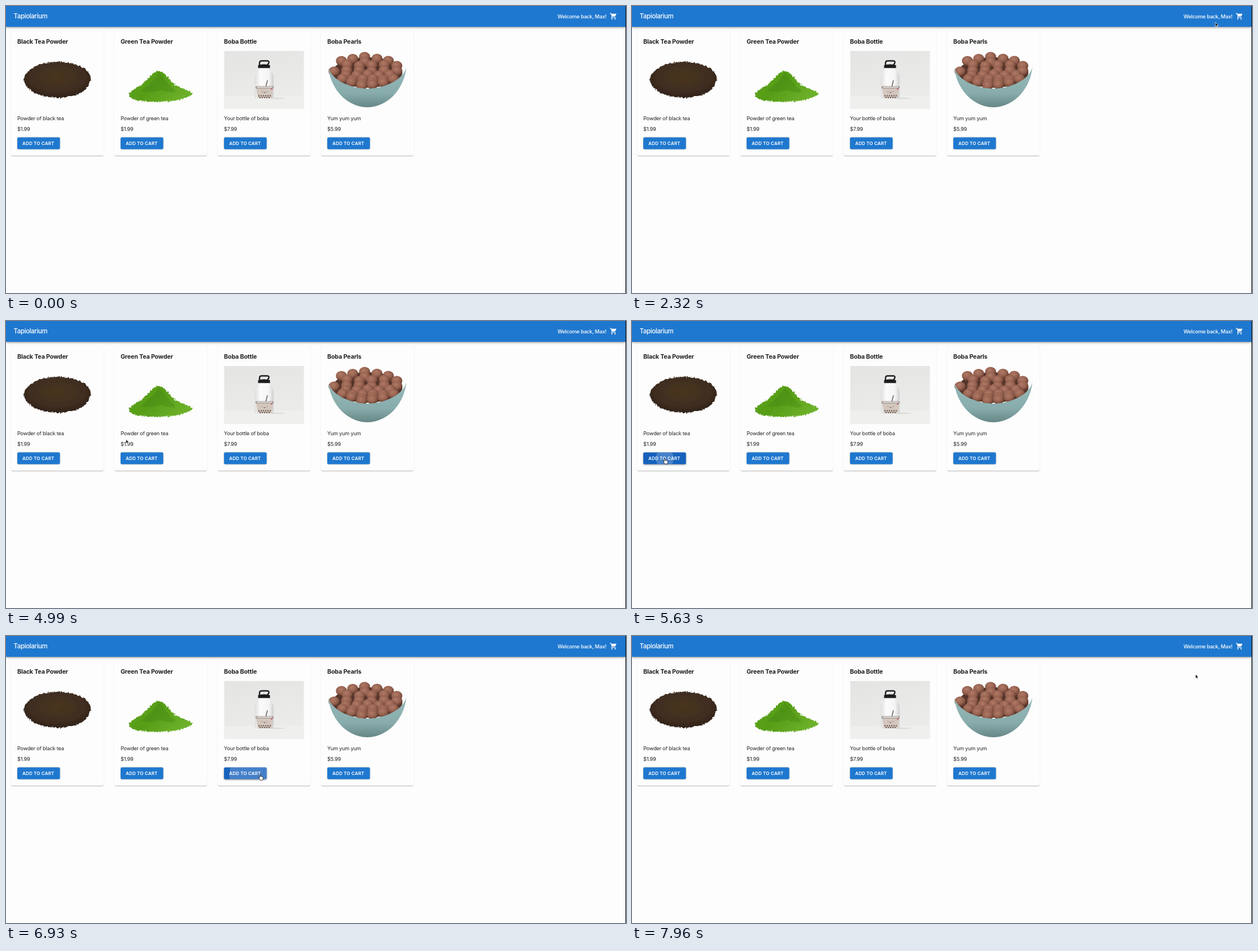
Write an HTML page that moves like this. It is 1098 px wide and 510 px high and loops after 7990 ms.

```html
<!DOCTYPE html>
<html lang="en">
<head>
<meta charset="utf-8">
<title>Shop</title>
<style>
  html, body { margin: 0; width: 100%; height: 100%; overflow: hidden; background: #fdfdfd; }
  #stage { position: absolute; left: 0; top: 0; width: 1098px; height: 510px; overflow: hidden; }
  #stage > * { position: absolute; }
  #bar {
    left: 0; top: 0; width: 1097px; height: 37px; background: #1f78cf;
    box-shadow: 0 1px 2px -.5px #0003, 0 2px 3px #0002, 0 .6px 6px #0002;
  }
  #edge { right: 0; top: 0; width: 1px; height: 510px; background: #0b0b0b; }
  .card {
    top: 45px; width: 164.5px; height: 221px; border-radius: 2.3px; background: #fdfdfd;
    box-shadow: 0 1.1px .6px -.6px #0005, 0 .6px .6px #0002, 0 .6px 1.7px #0002;
  }
  svg { left: 0; top: 0; }
  text { font-family: Inter, Roboto, sans-serif; fill: #212121; white-space: pre; }
  .h { font-size: 10.7px; font-weight: 700; letter-spacing: -.16px; }
  .p { font-size: 9.14px; letter-spacing: -.17px; }
  .b { font-size: 8px; font-weight: 600; letter-spacing: .16px; fill: #fff; }
  .brand { font-size: 11.4px; font-weight: 500; letter-spacing: -.35px; fill: #fff; }
  .w { fill: #fff; font-weight: 500; letter-spacing: -.24px; }
</style>
</head>
<body>
<div id="stage">
  <div id="bar"></div>
  <svg id="art" width="1098" height="510" viewBox="0 0 1098 510">
    <defs>
      <filter id="rough" x="-5%" y="-5%" width="110%" height="110%">
        <feTurbulence type="fractalNoise" baseFrequency=".3" numOctaves="2" seed="4"/>
        <feDisplacementMap in="SourceGraphic" scale="5" xChannelSelector="R" yChannelSelector="G"/>
      </filter>
      <radialGradient id="tea" cx=".5" cy=".42" r=".6">
        <stop offset="0" stop-color="#49351f"/><stop offset=".7" stop-color="#3f2d20"/><stop offset="1" stop-color="#2d2017"/>
      </radialGradient>
      <linearGradient id="leaf" x1="0" y1="0" x2="1" y2=".5">
        <stop offset="0" stop-color="#5fa51d"/><stop offset=".5" stop-color="#579d18"/><stop offset="1" stop-color="#6cb029"/>
      </linearGradient>
      <linearGradient id="wall" x1="0" y1="0" x2=".3" y2="1">
        <stop offset="0" stop-color="#e4e4e3"/><stop offset="1" stop-color="#ececea"/>
      </linearGradient>
      <linearGradient id="steel">
        <stop offset="0" stop-color="#dedede"/><stop offset=".3" stop-color="#fbfbfb"/><stop offset=".75" stop-color="#f4f4f4"/><stop offset="1" stop-color="#cfcfcf"/>
      </linearGradient>
      <radialGradient id="pearl" cx=".42" cy=".36" r=".65">
        <stop offset="0" stop-color="#b07a66"/><stop offset=".6" stop-color="#95614f"/><stop offset="1" stop-color="#633b2e"/>
      </radialGradient>
      <linearGradient id="bowl" x1="0" y1="0" x2="0" y2="1">
        <stop offset="0" stop-color="#97b9b9"/><stop offset=".65" stop-color="#88acac"/><stop offset="1" stop-color="#668786"/>
      </linearGradient>
    </defs>

    <text class="brand" x="13.6" y="22">Tapiolarium</text>
    <text class="p w" x="976.8" y="21.9">Welcome back, Max!</text>
    <path fill="#fff" transform="translate(1069 11.4) scale(.57)" d="M7 18c-1.1 0-1.99.9-1.99 2S5.9 22 7 22s2-.9 2-2-.9-2-2-2zM1 2v2h2l3.6 7.59-1.35 2.45c-.16.28-.25.61-.25.96 0 1.1.9 2 2 2h12v-2H7.42c-.14 0-.25-.11-.25-.25l.03-.12.9-1.63h7.45c.75 0 1.41-.41 1.75-1.03l3.58-6.49c.08-.14.12-.31.12-.48 0-.55-.45-1-1-1H5.21l-.94-2H1zm16 16c-1.1 0-1.99.9-1.99 2s.89 2 1.99 2 2-.9 2-2-.9-2-2-2z"/>

    <!-- black tea -->
    <path fill="url(#tea)" filter="url(#rough)" d="M32 130C33 114 58 99 91 99C124 99 150 112 150 129C149 148 126 163 92 163C58 163 32 148 32 130Z"/>

    <!-- green tea -->
    <g filter="url(#rough)">
      <path fill="url(#leaf)" d="M217 156C224 148 236 145 243 137C252 129 258 122 264 117Q271 113 278 118C286 125 292 134 301 141C311 147 322 149 331 155C327 162 317 163 309 166C297 171 283 169 271 170C256 170 243 171 231 167C224 165 218 163 217 156Z"/>
      <path fill="#3f8011" opacity=".35" d="M270 117C264 130 252 141 237 152C250 150 256 156 268 150C281 148 288 157 302 152C288 142 280 126 270 117Z"/>
    </g>

    <!-- bottle -->
    <rect x="386.5" y="80" width="141" height="103" fill="url(#wall)"/>
    <rect x="386.5" y="160" width="141" height="23" fill="#efefed"/>
    <ellipse cx="476" cy="164" rx="18" ry="1.500" fill="#dcdcda"/>
    <path fill="none" stroke="#1d1d1f" stroke-width="2.400" d="M449 106V101Q449 97.500 453 97.500H463Q467 98 465 102L462 106"/>
    <path fill="#1d1d1f" d="M446.500 105Q457 102 467.500 105V110.500H446.500Z"/>
    <path fill="url(#steel)" d="M447 110.500H467V115Q474 119 474 127V162Q474 165 470 165H444.500Q440.500 165 440.500 162V127Q440.500 119 447 115Z"/>
    <path stroke="#6b6260" stroke-width="1.500" fill="none" d="M460 144L463 132"/>
    <path fill="#d3c7be" d="M443 146H473L470.500 164H446Z"/>
    <rect x="442" y="142.500" width="32" height="4" rx="1.500" fill="#9a918d"/>
    <rect x="444" y="143.500" width="28" height="1.800" rx=".9" fill="#ece8e4"/>
    <circle cx="470.500" cy="147.500" r="1.300" fill="#c4565a"/>
    <path fill="none" stroke="#57443f" stroke-width="1" d="M453 152h1M462 152h1M456.500 153.500q1.500 1.300 3 0"/>
    <path stroke="#6a5852" stroke-width="2.400" stroke-linecap="round" stroke-dasharray="0 4" d="M448 159.500H470M450 162.700H470"/>

    <!-- bowl of pearls -->
    <ellipse cx="640" cy="118" rx="62" ry="27" fill="#54342a"/>
    <g id="pearls"></g>
    <path fill="url(#bowl)" d="M571 109C574 127 603 146 640 147C677 146 706 127 709 108C707 140 682 179 640 180C598 179 573 140 571 109Z"/>

    <g id="buttons"></g>
    <g id="labels"></g>
    <g id="cursor">
      <path id="arrow" fill="#111" stroke="#fff" stroke-width=".7" d="M0 0V7.400L1.700 5.900L2.900 8.600L4.200 8L3 5.400H5.300Z"/>
      <path id="hand" fill="#fff" stroke="#111" stroke-width=".8" stroke-linejoin="round" d="M-.9 .8Q0 -.6 .9 .8V4L1.400 3.500Q2.400 3.200 2.700 4Q3.800 3.600 4.200 4.500Q5.300 4.300 5.400 5.400V7.200Q5.400 8.500 4.600 10H0Q-.6 8.600 -1.800 7.200L-2.800 5.700Q-2.600 4.600 -1.500 5.300L-.9 6Z"/>
    </g>
  </svg>
  <div id="edge"></div>
</div>
<script>
  const LOOP = 7990, BTN = { y: 233.4, width: 75.5, height: 21.2, rx: 2.3 };
  const $ = id => document.getElementById(id);
  const clamp = v => Math.max(0, Math.min(1, v));
  const smooth = v => v * v * (3 - 2 * v);
  const mix = (a, b, k) => a + (b - a) * k;

  // cubic-bezier(.4, 0, .2, 1)
  function ease(x) {
    let lo = 0, hi = 1;
    for (let i = 0; i < 16; i++) {
      const s = (lo + hi) / 2, r = 1 - s;
      if (1.2 * s * r * r + .6 * s * s * r + s ** 3 < x) lo = s; else hi = s;
    }
    return smooth(hi);
  }

  // enter, press and leave times of each button
  const items = [
    { name: 'Black Tea Powder', info: 'Powder of black tea', price: '$1.99', x: 20, enter: 5240, press: 5460, leave: 5850 },
    { name: 'Green Tea Powder', info: 'Powder of green tea', price: '$1.99', x: 203, enter: 5975, press: 6050, leave: 6410 },
    { name: 'Boba Bottle', info: 'Your bottle of boba', price: '$7.99', x: 386.1, enter: 6470, press: 6635, leave: 7020 },
    { name: 'Boba Pearls', info: 'Yum yum yum', price: '$5.99', x: 569, enter: 7150, press: 7300, leave: 7540 }
  ];

  // cursor path: time, x, y
  const path = [
    [870, -8, 150], [1100, 14, 82], [1400, 32, 40], [1600, 42, 24], [1700, 42, 24],
    [1980, 500, 27], [2320, 1033, 29], [2480, 1043, 28], [2600, 1048, 27], [3170, 1077, 20],
    [4320, 1077, 20], [4650, 640, 108], [4990, 213, 210], [5090, 177, 221], [5300, 70, 243],
    [5400, 58, 244], [5780, 58, 244], [6020, 232, 244], [6350, 232, 244], [6540, 440, 246],
    [6630, 450, 246], [6980, 450, 246], [7180, 590, 246], [7300, 606, 246], [7490, 606, 246],
    [7700, 780, 150], [7960, 998, 68]
  ];

  function set(el, attrs) {
    for (const k in attrs) el.setAttribute(k, attrs[k]);
    return el;
  }

  function add(parent, tag, attrs, text = '') {
    const el = set(document.createElementNS('http://www.w3.org/2000/svg', tag), attrs);
    el.textContent = text;
    parent.append(el);
    return el;
  }

  items.forEach((it, i) => {
    const card = document.createElement('div');
    card.className = 'card';
    card.style.left = it.x - 11.2 + 'px';
    $('stage').insertBefore(card, $('art'));

    it.btn = add($('buttons'), 'rect', { x: it.x, ...BTN });
    add(add($('buttons'), 'clipPath', { id: 'clip' + i }), 'rect', { x: it.x, ...BTN });
    it.ripple = add($('buttons'), 'circle', { fill: '#fff', 'clip-path': `url(#clip${i})` });

    const label = (cls, dx, y, s) => add($('labels'), 'text', { class: cls, x: it.x + dx, y }, s);
    label('h', 0, 66.9, it.name);
    label('p', 0, 202.8, it.info);
    label('p', 0, 222.3, it.price);
    label('b', 9.1, 246.9, 'ADD TO CART');
  });

  // pearl rows: y, first x, last x, count
  const rows = [
    [89, 635, 635, 1], [94, 614, 657, 2], [98, 594, 677, 3], [105, 604, 692, 5],
    [115, 581, 692, 6], [122, 602, 680, 5], [130, 596, 686, 6], [136, 612, 668, 4], [140, 630, 649, 2]
  ];
  for (const [y, a, b, n] of rows)
    for (let i = 0; i < n; i++)
      add($('pearls'), 'ellipse', {
        cx: n > 1 ? mix(a, b, i / (n - 1)) : a, cy: y + Math.sin(i * 4 + y) * 1.2,
        rx: 9.8, ry: 8.6, fill: 'url(#pearl)'
      });

  const slope = (i, d) => (path[i + 1][d] - path[i][d]) / (path[i + 1][0] - path[i][0]);

  function tangent(i, d) {
    if (i === 0 || i === path.length - 1) return 0;
    const a = slope(i - 1, d), b = slope(i, d);
    return a * b <= 0 ? 0 : 2 * a * b / (a + b);
  }

  // monotone cubic through the path points
  function along(t, d) {
    const last = path.length - 1;
    if (t >= path[last][0]) return path[last][d];
    let i = 0;
    while (path[i + 1][0] <= t) i++;
    const p = path[i], q = path[i + 1], h = q[0] - p[0], u = (t - p[0]) / h;
    return mix(p[d], q[d], smooth(u))
      + h * u * (1 - u) * ((1 - u) * tangent(i, d) - u * tangent(i + 1, d));
  }

  function drawButton(it, t) {
    const k = ease(clamp((t - it.enter) / 250)) * (1 - ease(clamp((t - it.leave) / 250)));
    it.btn.style.fill = `rgb(${mix(31, 23, k)},${mix(120, 98, k)},${mix(207, 188, k)})`;
    it.btn.style.filter = `drop-shadow(0 ${mix(.8, 1.6, k)}px ${mix(.8, 1.7, k)}px rgba(0,0,0,${mix(.3, .42, k)}))`;

    const age = t - it.press, cx = along(it.press, 1), cy = along(it.press, 2);
    const dx = Math.max(cx - it.x, it.x + BTN.width - cx) + 1;
    const dy = Math.max(cy - BTN.y, BTN.y + BTN.height - cy) + 1;
    set(it.ripple, {
      cx, cy, r: Math.hypot(dx, dy) * ease(clamp(age / 550)),
      opacity: age < 0 ? 0 : mix(.14, .3, clamp(age / 300)) * (1 - clamp((age - 100) / 550))
    });
  }

  function draw(t) {
    for (const it of items) drawButton(it, t);
    const shown = t >= path[0][0];
    $('cursor').style.display = shown ? '' : 'none';
    if (!shown) return;
    const x = along(t, 1), y = along(t, 2);
    const onButton = y > BTN.y && y < BTN.y + BTN.height && items.some(it => x > it.x && x < it.x + BTN.width);
    const onCart = x > 1063 && y < 31;
    const hand = onButton || onCart;
    $('hand').style.display = hand ? '' : 'none';
    $('arrow').style.display = hand ? 'none' : '';
    $('cursor').setAttribute('transform', `translate(${x} ${y})`);
  }

  const start = performance.now();
  function tick() {
    draw((performance.now() - start) % LOOP);
    requestAnimationFrame(tick);
  }
  tick();
</script>
</body>
</html>
```
